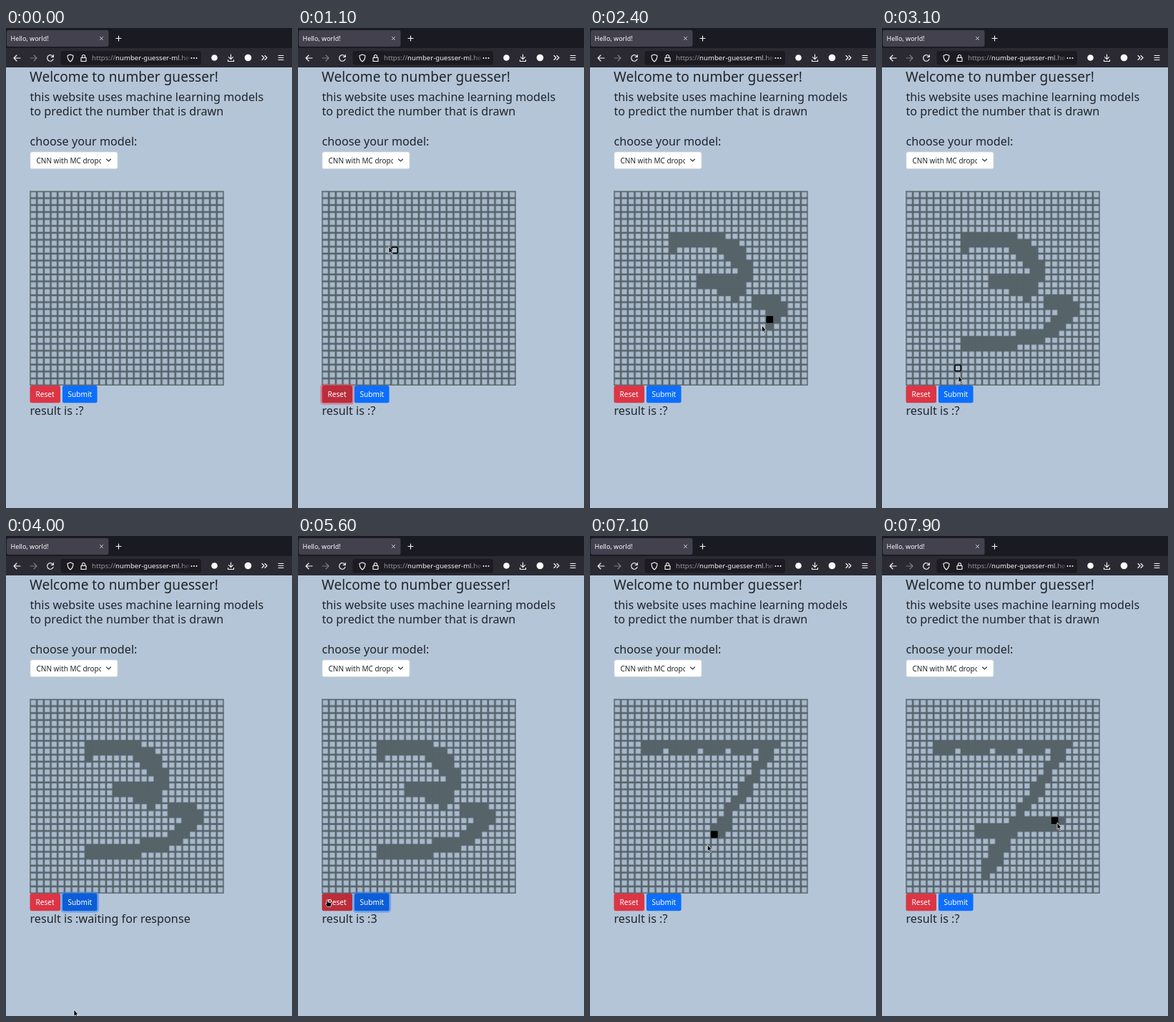
Write an HTML page that moves like this. It is 400 px wide and 670 px high and loops after 8 s.

```html
<!DOCTYPE html>
<html lang="en">
<head>
<meta charset="utf-8">
<title>Number guesser</title>
<style>
  html, body { margin: 0; width: 100%; height: 100%; overflow: hidden; background: #b4c5d8; }
  svg { display: block; }
  text { font-family: "Noto Sans", sans-serif; white-space: pre; }
  .page { font-size: 16.2px; fill: #212529; }
  .button { font-size: 10.1px; fill: #fff; }
  .icon { fill: none; stroke: #fbfbfe; stroke-width: 1.1; stroke-linecap: round; stroke-linejoin: round; }
  .ring { fill: none; stroke-width: 2.6; stroke-opacity: .5; }
</style>
</head>
<body>
<svg width="400" height="670" viewBox="0 0 400 670">
  <defs>
    <linearGradient id="fade" gradientUnits="userSpaceOnUse" x1="236" x2="260" y1="0" y2="0">
      <stop stop-color="#f4f4f8"/><stop offset="1" stop-color="#f4f4f8" stop-opacity="0"/>
    </linearGradient>
    <pattern id="cells" patternUnits="userSpaceOnUse" x="33.500" y="227.800" width="9.680" height="9.680">
      <rect width="9.680" height="9.680" fill="#566369"/>
      <rect x="1.300" y="1.300" width="7.080" height="7.080" fill="#a8b9cc"/>
    </pattern>
  </defs>

  <!-- browser bars -->
  <rect width="400" height="28" fill="#1a1b22"/>
  <rect x="1" y="3" width="142.500" height="23" rx="3" fill="#42414d"/>
  <text x="6.500" y="18" font-size="9" fill="#fbfbfe">Hello, world!</text>
  <rect y="28" width="400" height="27" fill="#2b2a33"/>
  <rect x="76.500" y="32" width="196.500" height="19.500" rx="3" fill="#1c1b22"/>
  <g class="icon">
    <path d="M131.500 12.500l4 4m0-4l-4 4" stroke-width=".8"/>
    <path d="M154 14.500h7m-3.500-3.500v7"/>
    <path d="M20 42h-9m4-4l-4 4 4 4"/>
    <path d="M34 42h9m-4-4l4 4-4 4" opacity=".4"/>
    <path d="M65.500 39.500a4.300 4.300 0 1 0 .6 3.700M66.300 37.500v3h-3"/>
    <path d="M90 37l4 1.500c0 4-1 6.500-4 8.500-3-2-4-4.500-4-8.500z"/>
    <path d="M105 41.500h7v5h-7zM106.500 41v-1.500a2 2 0 0 1 4 0V41"/>
    <path d="M314.500 37v6.500m-3-2.800l3 3 3-3M310.500 44.500v2h8v-2"/>
    <path d="M358 38.500l3 3-3 3m4-6l3 3-3 3M381 38.500h7m-7 3h7m-7 3h7"/>
  </g>
  <g fill="#fbfbfe">
    <circle cx="259.500" cy="42" r="1"/><circle cx="263" cy="42" r="1"/><circle cx="266.500" cy="42" r="1"/>
    <circle cx="291.500" cy="41.500" r="4.300"/>
    <circle cx="338.500" cy="41.500" r="4.800"/>
  </g>
  <text x="120" y="45" font-size="9.600" fill="url(#fade)"><tspan fill="#96969f">https://</tspan>number-guesser-ml.he</text>

  <!-- page -->
  <g class="page">
    <text x="33" y="75" font-size="19.100">Welcome to number guesser!</text>
    <text x="33.500" y="101.500">this website uses machine learning models</text>
    <text x="33.500" y="122">to predict the number that is drawn</text>
    <text x="33.500" y="163.500">choose your model:</text>
    <text x="33.500" y="540" id="result"></text>
  </g>
  <rect x="34" y="173" width="122" height="23.500" rx="2.500" fill="#fff" stroke="#ced4da" stroke-width=".7"/>
  <svg x="34" y="173" width="99" height="24"><text x="8.500" y="15.500" font-size="10" fill="#212529">CNN with MC dropout</text></svg>
  <path class="icon" d="M140.500 183l3 3 3-3" style="stroke:#343a40"/>

  <rect x="33.500" y="227.800" width="271.040" height="271.040" fill="url(#cells)" stroke="#566369" stroke-width=".5"/>
  <g id="ink" fill="#566369"></g>
  <rect id="hover" stroke-width="1.500"/>

  <rect id="resetRing" class="ring" x="32.300" y="497.900" width="44.900" height="26.600" rx="3.500" stroke="#e15361"/>
  <rect id="reset" x="33.500" y="499" width="42.500" height="24.300" rx="2.500"/>
  <text class="button" x="41.500" y="515">Reset</text>
  <rect id="submitRing" class="ring" x="77.800" y="497.900" width="51" height="26.600" rx="3.500" stroke="#3184fd"/>
  <rect id="submit" x="79" y="499" width="48.600" height="24.300" rx="2.500"/>
  <text class="button" x="86.500" y="515">Submit</text>

  <g id="pointer" fill="#000" stroke="#fff" stroke-width=".7" stroke-linejoin="round">
    <path id="arrow" d="M0 0v9.500l2.100-1.900 1.600 3.500 1.500-.7-1.600-3.400H6z"/>
    <path id="hand" d="M0 0q1-1 1.800 0v3l4 .7q1 .4.800 2L6 9.500H1.200L-2 5.500q.5-1.200 2 0z"/>
  </g>
</svg>
<script>
const LOOP = 8000, STEP = 100;
const HOVER_LAG = 40, MOUSE_INTERVAL = 20;
const LEFT = 33.5, TOP = 227.8, PITCH = 9.68, CELLS = 28;
const ENTER = 200, FIRST_RESET = 800, SUBMIT = 3300, ANSWER = 4900, SECOND_RESET = 5900;

const el = id => document.getElementById(id);
const svgNode = name => document.createElementNS('http://www.w3.org/2000/svg', name);
const within = (v, a, b) => v >= a && v < b;
const linear = k => k;
const easeOut = k => 1 - (1 - k) ** 2;

function setAttrs(node, attrs) {
  for (const name in attrs) node.setAttribute(name, attrs[name]);
}

// a pointer gesture along an SVG path; the pen paints cells
function gesture(from, to, d, { pen = false, ease = linear } = {}) {
  const path = svgNode('path');
  path.setAttribute('d', d);
  const length = path.getTotalLength();
  const at = t => path.getPointAtLength(ease(Math.min(1, Math.max(0, (t - from) / (to - from)))) * length);
  return { from, to, pen, at };
}

const three = 'M115 302V291H165Q212 305 212 348H154L180 355 203 367M231 378H248Q272 392 238 417Q200 436 115 436';
const gestures = [
  gesture(ENTER, 700, 'M306 12L60 508'),
  gesture(900, 1100, 'M60 508Q150 330 127 305', { ease: easeOut }),
  gesture(1100, 1300, 'M127 305L115 302'),
  gesture(1500, 2765, three, { pen: true }),
  gesture(2900, 3200, 'M115 436L103 510'),
  gesture(3500, 4000, 'M103 510L95 661', { ease: easeOut }),
  gesture(4600, 5000, 'M95 661L40 508', { ease: easeOut }),
  gesture(5950, 6350, 'M40 508L73 290', { ease: easeOut }),
  gesture(6500, 6780, 'M73 290L251 291', { pen: true }),
  gesture(6850, 7300, 'M251 291L143 465', { pen: true, ease: easeOut }),
  gesture(7400, 7580, 'M143 465L135 408'),
  gesture(7600, 7870, 'M135 408H158L185 399 245 400', { pen: true })
];

const gestureAt = t => gestures.findLast(g => g.from <= t) || gestures[0];
const cellAt = ({ x, y }) => [Math.floor((x - LEFT) / PITCH), Math.floor((y - TOP) / PITCH)];

// each mouse event inks the cell under the pointer and its right and lower neighbours
const marks = [];
function ink(col, row, time) {
  const node = svgNode('rect');
  setAttrs(node, { x: LEFT + col * PITCH, y: TOP + row * PITCH, width: PITCH + .2, height: PITCH + .2 });
  el('ink').append(node);
  marks.push({ node, time });
}
for (const g of gestures.filter(g => g.pen))
  for (let t = g.from; t <= g.to; t += MOUSE_INTERVAL) {
    const [col, row] = cellAt(g.at(t));
    ink(col, row, t);
    ink(col + 1, row, t);
    ink(col, row + 1, t);
  }

const show = (node, on) => node.style.display = on ? '' : 'none';

function drawButton(id, over, focused, normal, active) {
  el(id).setAttribute('fill', over || focused ? active : normal);
  show(el(id + 'Ring'), focused);
}

function drawHover(t) {
  const g = gestureAt(t);
  const [col, row] = cellAt(gestureAt(t - HOVER_LAG).at(t - HOVER_LAG));
  const inset = g.pen ? 0 : .7, size = PITCH - 2 * inset;
  show(el('hover'), t >= ENTER && within(col, 0, CELLS) && within(row, 0, CELLS));
  setAttrs(el('hover'), {
    x: LEFT + col * PITCH + inset, y: TOP + row * PITCH + inset, width: size, height: size,
    rx: g.pen ? 0 : 1.2, fill: g.pen ? '#000' : 'none', stroke: g.pen ? 'none' : '#000'
  });
}

function draw(t) {
  const cleared = t >= SECOND_RESET ? SECOND_RESET : 0;
  for (const { node, time } of marks) show(node, time > cleared && time <= t - HOVER_LAG);
  drawHover(t);

  const { x, y } = gestureAt(t).at(t);
  const onButtons = t >= ENTER && within(y, 499, 523.5);
  const overReset = onButtons && within(x, 33, 76), overSubmit = onButtons && within(x, 79, 128);
  const resetFocused = within(t, FIRST_RESET, 1500) || within(t, SECOND_RESET, 6500);
  drawButton('reset', overReset, resetFocused, '#dc3545', '#bb2d3b');
  drawButton('submit', overSubmit, within(t, SUBMIT, SECOND_RESET), '#0d6efd', '#0b5ed7');

  const answer = within(t, SUBMIT, ANSWER) ? 'waiting for response' : within(t, ANSWER, SECOND_RESET) ? '3' : '?';
  el('result').textContent = 'result is :' + answer;

  show(el('pointer'), t >= ENTER);
  show(el('arrow'), !(overReset || overSubmit));
  show(el('hand'), overReset || overSubmit);
  setAttrs(el('pointer'), { transform: `translate(${x} ${y})` });
}

const start = performance.now();
function frame() {
  const t = (performance.now() - start) % LOOP;
  draw(Math.floor(t / STEP) * STEP);
  requestAnimationFrame(frame);
}
frame();
</script>
</body>
</html>
```
